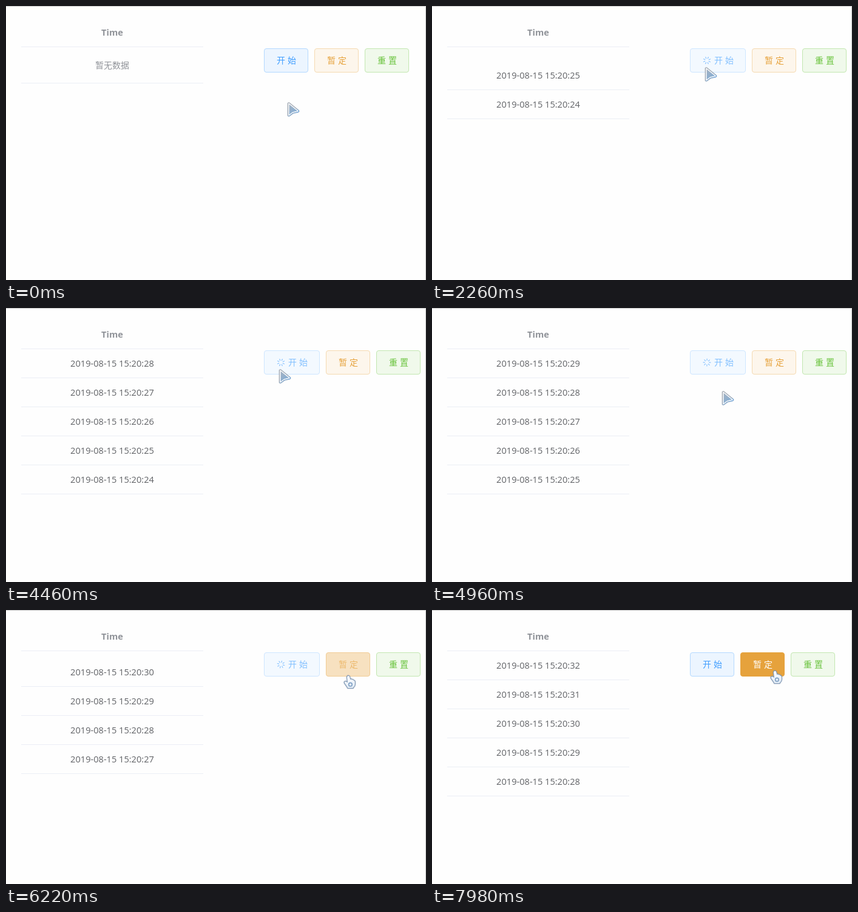
Recreate the animation shown at these times as an HTML page with a canvas. Size 692 px wide and 453 px high, loop 8 s.

```html
<!DOCTYPE html>
<html lang="zh-CN">
<head>
<meta charset="utf-8">
<title>Timer table</title>
<style>
  html, body { margin: 0; width: 100%; height: 100%; overflow: hidden; background: #fefefe; }
  canvas { display: block; }
</style>
</head>
<body>
<canvas id="stage" width="692" height="453"></canvas>
<script>
const ctx = document.getElementById('stage').getContext('2d');

const LOOP = 8000, STEP = 20;
const START = 556, PERIOD = 800, SLIDE = 370, ROW_H = 48, MAX_ROWS = 5, LAST_ROW = 8;
const PAUSE = 7120, FADE = 80;
const HOVER_START = 390, HOVER_PAUSE = 6200;
const LATIN = '"Open Sans", "Noto Sans", sans-serif';
const CJK = '"Noto Sans CJK SC", "Noto Sans CJK", sans-serif';

const theme = {
  primary: { text: [64, 158, 255], bg: [236, 245, 255], line: [179, 216, 255] },
  warning: { text: [230, 162, 60], bg: [253, 246, 236], line: [245, 218, 177] },
  success: { text: [103, 194, 58], bg: [240, 249, 235], line: [194, 231, 176] }
};
const WHITE = [255, 255, 255];

// Pointer tip: time, x, y
const path = [
  [340, 464, 159], [440, 450, 101], [4700, 450, 101], [4960, 478, 137],
  [5240, 514, 143], [5560, 545, 138], [6060, 564, 128],
  [6200, 565, 109], [6420, 565, 97], [7979, 565, 97], [7980, 566, 100]
];

const clamp = v => Math.max(0, Math.min(1, v));
const lerp = (a, b, k) => a + (b - a) * k;
const mix = (a, b, k) => a.map((v, i) => lerp(v, b[i], k));
const rgb = c => `rgb(${c.map(Math.round).join(',')})`;

// cubic-bezier(.25, .1, .25, 1)
function ease(p) {
  if (p <= 0) return 0;
  if (p >= 1) return 1;
  const curve = (a, b, s) => 3 * a * s * (1 - s) ** 2 + 3 * b * s * s * (1 - s) + s ** 3;
  let lo = 0, hi = 1;
  for (let i = 0; i < 24; i++) {
    const mid = (lo + hi) / 2;
    if (curve(0.25, 0.25, mid) < p) lo = mid; else hi = mid;
  }
  return curve(0.1, 1, lo);
}

function pointerAt(t) {
  if (t <= path[0][0]) return path[0].slice(1);
  for (let i = 1; i < path.length; i++) {
    const a = path[i - 1], b = path[i];
    if (t < b[0]) {
      const k = (t - a[0]) / (b[0] - a[0]);
      return [lerp(a[1], b[1], k), lerp(a[2], b[2], k)];
    }
  }
  return path[path.length - 1].slice(1);
}

function text(str, x, y, color, font, align = 'left') {
  ctx.font = font;
  ctx.fillStyle = color;
  ctx.textAlign = align;
  ctx.fillText(str, x, y);
}

function rule(y) {
  ctx.fillStyle = '#ebeef5';
  ctx.fillRect(25, y, 300, 1);
}

function drawRow(sec, top) {
  text('2019-08-15 15:20:' + sec, 175, top + 29, '#606266', '14.6px ' + LATIN, 'center');
  rule(top + 47);
}

function drawTable(t) {
  text('Time', 175, 49, '#909399', 'bold 14.6px ' + LATIN, 'center');
  rule(67);
  if (t < START) {
    text('暂无数据', 175, 103, '#909399', '14px ' + CJK, 'center');
    rule(127);
    return;
  }
  const newest = Math.min(LAST_ROW, Math.floor((t - START) / PERIOD));
  const p = clamp((t - START - newest * PERIOD) / SLIDE);
  const shift = Math.round((ease(p) - 1) * ROW_H);
  const count = Math.min(MAX_ROWS, newest + 1);
  for (let i = 1; i < count; i++) drawRow(24 + newest - i, 68 + i * ROW_H + shift);
  ctx.globalAlpha = clamp((p - 0.65) / 0.35);
  drawRow(24 + newest, 68);
  ctx.globalAlpha = 1;
}

function drawSpinner(x, y, angle, color) {
  ctx.save();
  ctx.translate(x, y);
  ctx.rotate(angle);
  ctx.strokeStyle = color;
  ctx.lineWidth = 1.1;
  ctx.lineCap = 'round';
  ctx.beginPath();
  for (let i = 0; i < 8; i++) {
    ctx.rotate(Math.PI / 4);
    ctx.moveTo(0, -3.5);
    ctx.lineTo(0, -6);
  }
  ctx.stroke();
  ctx.restore();
}

function drawButton(x, label, colors, hover, angle = null) {
  const loading = angle !== null;
  const veil = c => loading ? mix(c, WHITE, 0.35) : c;
  const color = rgb(veil(mix(colors.text, WHITE, hover)));
  const w = loading ? 92 : 73;
  ctx.beginPath();
  ctx.roundRect(x + 0.5, 70.5, w - 1, 39, 3.5);
  ctx.fillStyle = rgb(veil(mix(colors.bg, colors.text, hover)));
  ctx.fill();
  ctx.strokeStyle = rgb(veil(mix(colors.line, colors.text, hover)));
  ctx.lineWidth = 1;
  ctx.stroke();
  const left = x + (loading ? 40 : 21);
  [...label].forEach((ch, i) => text(ch, left + i * 18, 95, color, '14px ' + CJK));
  if (loading) drawSpinner(x + 28, 90, angle, color);
}

function drawButtons(t) {
  const loading = t >= START && t < PAUSE;
  const angle = loading ? (t - START) / 1600 * Math.PI * 2 : null;
  const hoverStart = t < START ? clamp((t - HOVER_START) / FADE) : 0;
  const hoverPause = clamp((t - HOVER_PAUSE) / FADE);
  const x = loading ? 527 : 508;
  drawButton(425, '开始', theme.primary, hoverStart, angle);
  drawButton(x, '暂定', theme.warning, hoverPause);
  drawButton(x + 83, '重置', theme.success, 0);
}

function outline(shape, color, width) {
  ctx.strokeStyle = color;
  ctx.lineWidth = width;
  ctx.stroke(shape);
}

const arrow = new Path2D('M2 2.5 V21.5 L8.2 16.8 L17 14.8 Z');
const hand = new Path2D('M-3 3 Q-2.5 0.5 -0.5 1 Q0.8 1.2 1.2 3 L2.2 7 ' +
  'Q4 5.8 5.2 7.6 Q7 6.8 7.8 8.8 Q9.6 8.6 9.8 11 L9.8 15 Q9.6 18 7.4 19.5 L6.6 21 ' +
  'H-1.6 L-3.4 18 L-7 12.8 Q-8 10.8 -6 10.2 Q-4.6 10 -2 12 Z');

function drawArrow() {
  const edge = ctx.createLinearGradient(3, 6, 13, 20);
  edge.addColorStop(0, '#98a0ab');
  edge.addColorStop(0.6, '#8d9bad');
  edge.addColorStop(1, '#3f8edb');
  outline(arrow, 'rgba(120,130,145,0.25)', 5.4);
  outline(arrow, edge, 4);
  outline(arrow, '#ffffff', 2);
  const fill = ctx.createLinearGradient(2, 4, 12, 18);
  fill.addColorStop(0, '#a5b2c1');
  fill.addColorStop(1, '#86aed4');
  ctx.fillStyle = fill;
  ctx.fill(arrow);
  outline(arrow, '#ffffff', 1);
}

function drawHand() {
  outline(hand, 'rgba(125,140,160,0.3)', 3.6);
  outline(hand, '#8199b6', 2.2);
  const fill = ctx.createLinearGradient(0, 2, 4, 21);
  fill.addColorStop(0, '#ffffff');
  fill.addColorStop(1, '#dfe9f4');
  ctx.fillStyle = fill;
  ctx.fill(hand);
  ctx.beginPath();
  ctx.arc(2.4, 15.2, 2.8, 0, Math.PI * 2);
  ctx.strokeStyle = '#7fa0c4';
  ctx.lineWidth = 1.6;
  ctx.stroke();
}

function drawPointer(t) {
  const [x, y] = pointerAt(t);
  const isHand = (t >= HOVER_START && t < START) || t >= HOVER_PAUSE;
  ctx.save();
  ctx.translate(Math.round(x), Math.round(y));
  ctx.lineJoin = 'round';
  if (isHand) drawHand(); else drawArrow();
  ctx.restore();
}

function draw(t) {
  ctx.fillStyle = '#fefefe';
  ctx.fillRect(0, 0, 692, 453);
  ctx.fillStyle = '#c8c8c8';
  ctx.fillRect(0, 0, 692, 1);
  ctx.fillRect(691, 0, 1, 453);
  drawTable(t);
  drawButtons(t);
  drawPointer(t);
}

const began = performance.now();
function tick() {
  const t = (performance.now() - began) % LOOP;
  draw(Math.floor(t / STEP) * STEP);
  requestAnimationFrame(tick);
}
tick();
</script>
</body>
</html>
```
